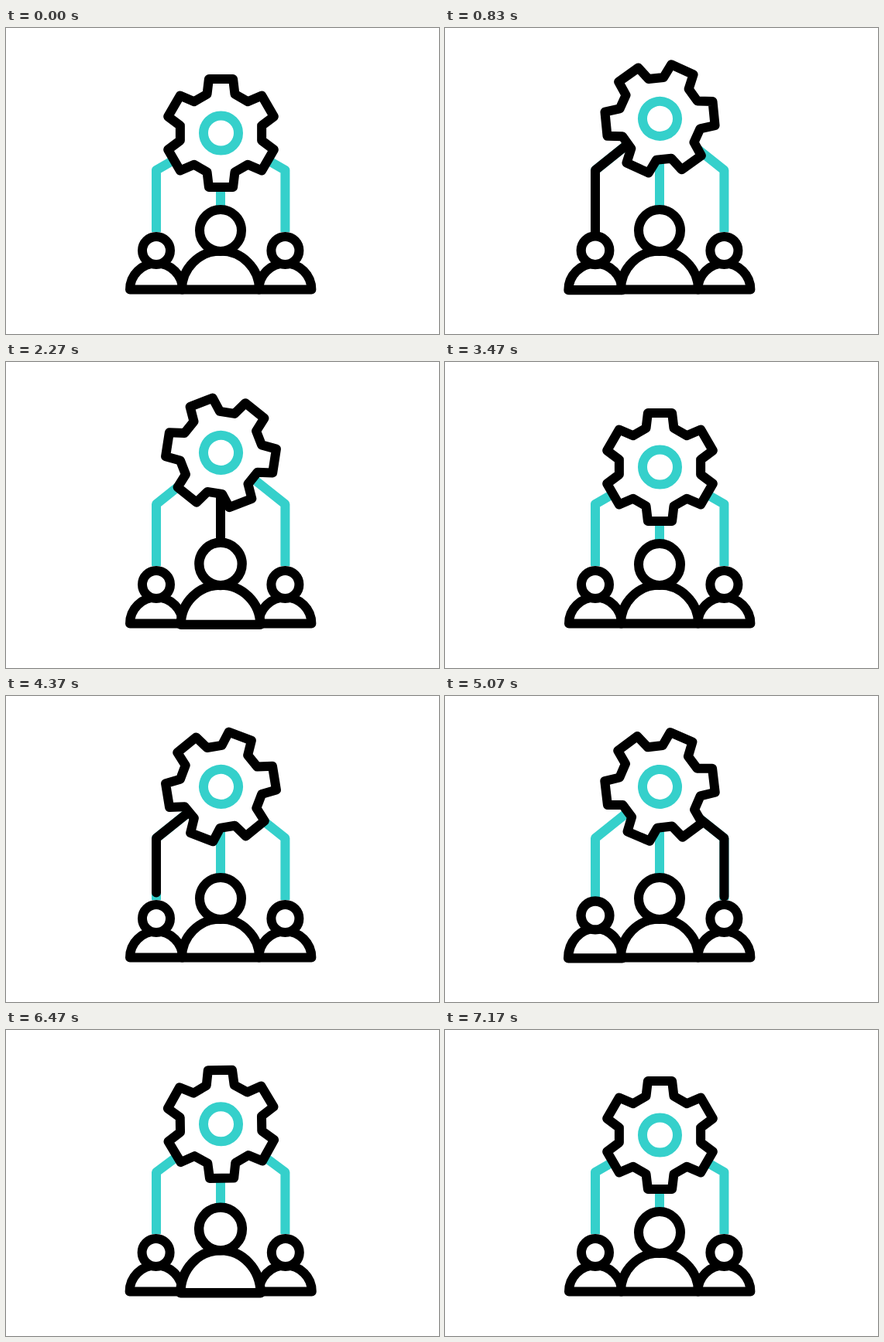
These frames come from a looping animation (559 px wide and 396 px high, 7.21 s). An HTML page:

```html
<!DOCTYPE html>
<html lang="en">
<head>
<meta charset="utf-8">
<title>Team process</title>
<style>
  html, body { margin: 0; width: 100%; height: 100%; overflow: hidden; background: #fff; }
  svg { display: block; width: 559px; height: 396px; }
  svg * { stroke-width: 12; stroke-linejoin: round; }
  .ink { fill: #fff; stroke: #000; }
  .teal { fill: none; stroke: #35d0cb; }
  .pulse { fill: none; stroke: #000; stroke-linecap: round; }
</style>
</head>
<body>
<svg id="stage" viewBox="0 0 559 396"></svg>
<script>
const LOOP = 7210, CYCLE = 3600;
const MID_X = 277, GEAR_X = 277.5, HOME_Y = 136, RISE = 18.6, FLOOR = 338.6;
const stage = document.getElementById('stage');

function add(parent, tag, attrs) {
  const node = document.createElementNS('http://www.w3.org/2000/svg', tag);
  for (const key in attrs) node.setAttribute(key, attrs[key]);
  return parent.appendChild(node);
}

const ramp = (t, from, to) => Math.min(1, Math.max(0, (t - from) / (to - from)));
const smooth = x => x * x * (3 - 2 * x);
const bump = (t, from, to) => Math.sin(Math.PI * ramp(t, from, to));
const easeInOut = (x, power) =>
  x < 0.5 ? (2 * x) ** power / 2 : 1 - (2 - 2 * x) ** power / 2;

function gearPath() {
  const corners = [[53.5, -19.6], [71.6, -12.6], [71.6, 12.6], [53.5, 19.6]];
  const points = [];
  for (let tooth = 0; tooth < 6; tooth++) {
    for (const [radius, offset] of corners) {
      const a = (tooth * 60 + offset) * Math.PI / 180;
      points.push((radius * Math.sin(a)).toFixed(2) + ' ' + (-radius * Math.cos(a)).toFixed(2));
    }
  }
  return 'M' + points.join('L') + 'Z';
}

// side: direction from the middle; arrive: when the pulse reaches the head
const people = [
  { x: 194, side: -1, headY: 288, headR: 18, bodyR: 34, midY: 304, lineEnd: 264, arrive: 790 },
  { x: 360.4, side: 1, headY: 288, headR: 18, bodyR: 34, midY: 304, lineEnd: 264, arrive: 1480 },
  { x: MID_X, side: 0, headY: 262, headR: 27, bodyR: 50, midY: 287, lineEnd: 236, arrive: 2210 }
];

for (const p of people) {
  p.line = add(stage, 'path', { class: 'teal' });
  p.pulse = add(stage, 'path', { class: 'pulse', pathLength: 1 });
}
for (const p of people) {
  p.group = add(stage, 'g', {});
  p.body = add(p.group, 'path', { class: 'ink' });
  p.head = add(p.group, 'circle', { class: 'ink', cx: p.x, r: p.headR });
}
const gear = add(stage, 'g', {});
add(gear, 'path', { class: 'ink', d: gearPath() });
add(gear, 'circle', { class: 'teal', r: 22.5 });

function drawPerson(p, t, gearY, spread) {
  const bend = p.side ? `L${p.x} 184` : '';
  const d = `M${MID_X} ${gearY}${bend}L${p.x} ${p.lineEnd}`;
  p.line.setAttribute('d', d);
  p.pulse.setAttribute('d', d);

  const front = ramp(t, p.arrive - 370, p.arrive);
  const tail = smooth(ramp(t, p.arrive + 200, p.arrive + 600));
  p.pulse.setAttribute('visibility', front > tail ? 'visible' : 'hidden');
  p.pulse.setAttribute('stroke-dasharray', `${front - tail} 2`);
  p.pulse.setAttribute('stroke-dashoffset', -tail);

  // The figure swells, then settles with a small upward stretch.
  const stretch = 3.6 * bump(t, p.arrive + 560, p.arrive + 785);
  p.head.setAttribute('cy', p.headY - stretch);
  p.body.setAttribute('d', `M${p.x - p.bodyR} ${FLOOR}` +
    `A${p.bodyR} ${p.bodyR + stretch} 0 0 1 ${p.x + p.bodyR} ${FLOOR}Z`);

  const scale = 1 + 0.1 * bump(t, p.arrive, p.arrive + 740);
  p.group.setAttribute('transform',
    `translate(${p.x + p.side * spread} ${p.midY}) scale(${scale}) translate(${-p.x} ${-p.midY})`);
}

function draw(time) {
  const t = time % LOOP % CYCLE;
  const lift = smooth(ramp(t, 0, 380)) - smooth(ramp(t, 2750, 3130));
  const gearY = HOME_Y - RISE * lift;
  const angle = 180 * easeInOut(ramp(t, 0, 3050), 2.15);
  const spread = 8.5 * (smooth(ramp(t, 2850, 3010)) - smooth(ramp(t, 3030, 3400)));

  gear.setAttribute('transform', `translate(${GEAR_X} ${gearY}) rotate(${angle})`);
  for (const p of people) drawPerson(p, t, gearY, spread);
}

const start = performance.now();
function tick() {
  draw(performance.now() - start);
  requestAnimationFrame(tick);
}
tick();
</script>
</body>
</html>
```
